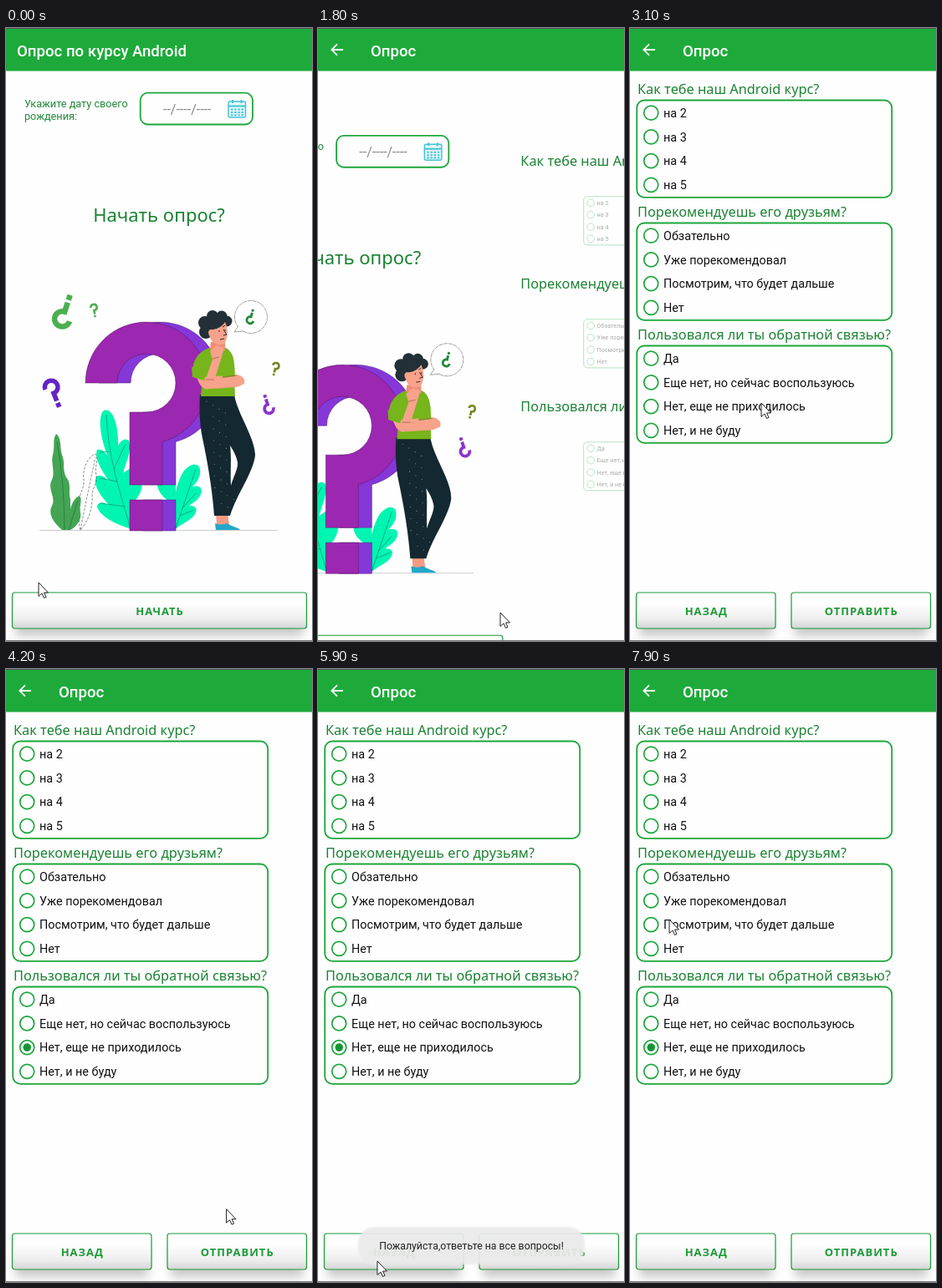
Recreate the animation shown at these times as an HTML page. Size 366 px wide and 734 px high, loop 8 s.

```html
<!DOCTYPE html>
<html lang="ru">
<head>
<meta charset="utf-8">
<style>
html, body { margin: 0; width: 100%; height: 100%; overflow: hidden; background: #fefefe }
svg { display: block }
text { font-family: Roboto, sans-serif }
.noto { font-family: "Noto Sans", "Open Sans", sans-serif; fill: #1a8232 }
.bar { font-size: 18.6px; font-weight: 500; fill: #fff }
.button text { font: 700 13px "Noto Sans", "Open Sans", sans-serif; letter-spacing: 1px; fill: #1d9a38 }
.line { fill: none; stroke: #1ea63b }
</style>
</head>
<body>
<svg width="366" height="734" viewBox="0 0 366 734">
  <defs>
    <linearGradient id="shade" x2="0" y2="1">
      <stop offset=".3" stop-color="#fefefe"/><stop offset=".75" stop-color="#ededed"/><stop offset="1" stop-color="#d4d4d4"/>
    </linearGradient>
    <filter id="blur" x="-10%" y="-60%" width="120%" height="220%"><feGaussianBlur stdDeviation="6"/></filter>
    <filter id="soft" x="-10%" y="-30%" width="120%" height="160%"><feGaussianBlur stdDeviation="1"/></filter>
    <path id="mark" d="M-73-52A73 73 0 1 1 19 18.5V70H-20V-17H0A35 35 0 1 0-35-52ZM-20 88H19V125H-20Z"/>
  </defs>

  <g id="home">
    <g font-size="12.7" fill="#23883a">
      <text x="22" y="95">Укажите дату своего</text>
      <text x="22" y="109.5">рождения:</text>
    </g>
    <rect x="160.7" y="77.7" width="134.3" height="37.8" rx="9" class="line" stroke-width="1.8"/>
    <text x="188" y="102.5" font-size="16" fill="#888">--/----/----</text>
    <g fill="none" stroke="#45c3d5" stroke-width="1.5">
      <rect x="266" y="88" width="20.5" height="19" rx="2" fill="#e4f8fa"/>
      <path d="M266 93.5H286.5M271 86V90M281.5 86V90" stroke-width="2"/>
      <path d="M269 97.5H284M269 101H284M269 104.3H284" stroke-dasharray="2.4 1.8" stroke-width="2"/>
    </g>
    <text class="noto" x="183" y="231.5" font-size="22" text-anchor="middle">Начать опрос?</text>

    <path d="M40 601.5H325" stroke="#ccc"/>
    <g fill="#00f5b2">
      <path d="M149 600C132 594 111 585 109 572Q112 565 123 571C111 558 104 546 108 537Q116 533 125 545C114 530 105 514 109 505Q116 503 122 513C113 493 109 465 117 458C128 454 135 477 134 500Q140 489 147 494C151 506 143 521 140 533L150 526V546H163Q162 558 154 566H149Z"/>
      <path d="M203 600C199 573 201 549 213 530Q224 518 231 525C235 534 229 544 223 549Q234 547 234 555C232 565 224 568 219 572Q230 572 227 580C223 590 211 592 203 600ZM181 547H203V566H194Q182 558 181 547Z"/>
    </g>
    <g fill="none" stroke="#147d68" stroke-width=".6">
      <path d="M149 600C137 556 123 520 120 463M142 573 113 569M133 543 112 539M129 528 143 498M123 507 112 508M203 599 227 528M211 575 227 557M208 584 225 577"/>
      <path d="M89 601C85 590 90 582 87 573C85 561 94 553 93 541C91 528 98 513 107 510C112 517 105 526 108 535C110 546 102 551 103 561C104 574 98 592 89 601ZM89 601Q98 555 107 514" stroke="#444" stroke-dasharray="3 1.6"/>
    </g>
    <path d="M67 601C56 592 50 581 55 572C60 562 50 553 54 543C60 532 53 522 56 511C59 500 55 493 60 486C67 491 64 502 67 511C71 520 67 528 72 538C79 546 74 555 77 564L77 576C79 568 83 562 88 560C92 566 87 573 89 580C91 589 84 597 77 601Z" fill="#43a554"/>
    <path d="M70 601Q70 545 61 495M75 601 86 566" fill="none" stroke="#28763c" stroke-width=".8"/>

    <use href="#mark" x="184" y="477" fill="#8537d8" stroke="#452077" stroke-width=".5"/>
    <use href="#mark" x="168" y="477" fill="#9c27b0" stroke="#501760" stroke-width=".5"/>
    <g id="marks"></g>

    <circle cx="293" cy="346" r="19.5" fill="#fefefe" stroke="#777" stroke-width=".7" stroke-dasharray="5 .8"/>
    <path d="M278 357 273 364 284 363" fill="#fefefe" stroke="#777" stroke-width=".7"/>
    <use href="#mark" transform="translate(293 346) rotate(195) scale(.075)" fill="#23883a"/>

    <path d="M251 580H265L267 595H252Z" fill="#f59b82"/>
    <path d="M250 593Q257 596 264 593C270 597 278 598 280 601H251Z" fill="#22a7c8"/>
    <path d="M232 439H273C277 463 298 490 298 512C295 534 277 556 268 584H249C247 554 241 520 236 496C231 475 231 456 232 439ZM268 500C270 516 268 532 269 548C272 537 278 527 277 520Q275 510 268 500Z" fill="#142831" fill-rule="evenodd"/>
    <g id="dots" fill="#8a989c"></g>
    <path d="M243 383C229 388 222 399 223 417L235 420 233 441H274L273 416C274 398 272 388 263 383Z" fill="#76b51b"/>
    <path d="M245 376H262V386Q253 392 244 384Z" fill="#ef8e78"/>
    <g fill="#233037">
      <circle cx="238" cy="353" r="8"/><circle cx="247" cy="345" r="7"/><circle cx="258" cy="345" r="6.5"/>
      <circle cx="264" cy="351" r="6.5"/><circle cx="239" cy="364" r="8"/><circle cx="249" cy="356" r="12"/>
    </g>
    <path d="M248 361Q258 359 262 352C266 360 266 371 261 378C253 382 245 376 244 370Q240 364 244 361Z" fill="#f7a28a"/>
    <path d="M251 360 256 357M259 358 262 356M260 361 264 367 260 368M256 373 261 372M255 362V364M262 361V363" fill="none" stroke="#263238"/>
    <path d="M227 416 239 420 247 397 244 387 252 380 261 383 257 397 247 429Q240 437 232 427Z" fill="#f7a28a"/>
    <path d="M238 418 277 415Q287 418 285 426L276 430 244 432Q235 427 238 418Z" fill="#f7a28a"/>
    <path d="M222 406 240 408 237 422 223 418ZM260 401 273 402 274 417 259 419Z" fill="#76b51b"/>
    <path d="M239 421 249 421M259 418 276 416M247 396 255 394" fill="none" stroke="#9d594b" stroke-width=".7"/>
  </g>

  <g id="survey"></g>

  <rect width="366" height="51.5" fill="#1daa3a"/>
  <path d="M0 .5H366" stroke="#53515c"/>
  <text id="homeBar" class="bar" x="13" y="33.5">Опрос по курсу Android</text>
  <g id="surveyBar">
    <text class="bar" x="63" y="33.5">Опрос</text>
    <path d="M30 26H16.5M23 19.3 16.3 26 23 32.7" fill="none" stroke="#fff" stroke-width="1.8"/>
  </g>

  <g id="toast">
    <rect x="48" y="668" width="271" height="45" rx="20" fill="#eaeaea" fill-opacity=".93" filter="url(#soft)"/>
    <text x="183.5" y="694.5" font-size="12.3" fill="#222" text-anchor="middle">Пожалуйста,ответьте на все вопросы!</text>
  </g>
  <path d="M0 733.5H366" stroke="#777"/>
  <path id="cursor" d="M0 0V16.5L4 13 6.5 18.5 9 17.4 6.6 12H11.5Z" fill="#fff" stroke="#222"/>
</svg>
<script>
const $ = id => document.getElementById(id);
const LOOP = 8000;

const button = (x, w, label, id) => `<g class="button">
  <rect x="${x + 4}" y="694" width="${w - 8}" height="34" fill="#aaa" opacity=".65" filter="url(#blur)"/>
  <rect x="${x}" y="676" width="${w}" height="43" rx="3" fill="url(#shade)"/>
  <rect id="${id}" x="${x}" y="676" width="${w}" height="43" rx="3" fill="#a6e0b2" fill-opacity="0" stroke="#1d9a38" stroke-width="1.2"/>
  <text x="${x + w / 2 + .5}" y="702.5" text-anchor="middle">${label}</text></g>`;

const questions = [
  ['Как тебе наш Android курс?', 'на 2', 'на 3', 'на 4', 'на 5'],
  ['Порекомендуешь его друзьям?', 'Обзательно', 'Уже порекомендовал', 'Посмотрим, что будет дальше', 'Нет'],
  ['Пользовался ли ты обратной связью?', 'Да', 'Еще нет, но сейчас воспользуюсь', 'Нет, еще не приходилось', 'Нет, и не буду']
];

const option = (label, i) => {
  const y = 101.7 + i * 28.7;
  return `<circle cx="25.2" cy="${y}" r="8.5" class="line" stroke-width="1.7"/>
    <text x="40" y="${y + 5.2}" font-size="14.4" fill="#111">${label}</text>`;
};

$('survey').innerHTML = questions.map(([title, ...options], i) =>
  `<g transform="translate(0 ${i * 147})"><text class="noto" x="9" y="79" font-size="16.3">${title}</text>
  <g class="options"><rect x="8.2" y="86.5" width="305" height="116.3" rx="9" class="line" stroke-width="1.8"/>
  ${options.map(option).join('')}</g></g>`).join('') +
  '<circle id="choice" cx="25.2" cy="453.1" r="4.8" fill="#129631"/>' +
  button(7.5, 166.5, 'НАЗАД', 'back') + button(193, 166.5, 'ОТПРАВИТЬ', 'send');

$('home').insertAdjacentHTML('beforeend', button(7.5, 352, 'НАЧАТЬ', 'start'));

$('marks').innerHTML = [
  [70, 340, 198, .17, '#4caf50'], [105.5, 338, -8, .067, '#4caf50'], [57, 437, -22, .145, '#6424c4'],
  [313, 451, 162, .1, '#8a35cc'], [322, 408, 14, .067, '#76831f']
].map(([x, y, angle, scale, color]) =>
  `<use href="#mark" transform="translate(${x} ${y}) rotate(${angle}) scale(${scale})" fill="${color}"/>`).join('');

$('dots').innerHTML = Array.from({ length: 28 }, (_, i) => {
  const y = 447 + i * 4.7, x = 240 + i * .45 + (i * 7) % 22;
  return `<circle cx="${x}" cy="${y}" r=".55"/>`;
}).join('');

const clamp = v => Math.min(1, Math.max(0, v));
const ramp = (t, from, to) => clamp((t - from) / (to - from));
const ease = u => .5 - .5 * Math.cos(Math.PI * u);
const pulse = (t, a, b, c, d) => ramp(t, a, b) * (1 - ramp(t, c, d));

// time, x, y
const path = [
  [100, 39, 664], [600, 218, 700], [1900, 218, 700], [2400, 183, 487], [3000, 157, 449],
  [3700, 157, 449], [4400, 288, 692], [4750, 288, 692], [5000, 358, 590], [5300, 350, 600],
  [5900, 71, 709], [6500, 60, 650], [7500, 47, 310], [7900, 47, 300]
];

function cursorAt(t) {
  const next = path.findIndex(p => p[0] >= t);
  if (next < 0) return path.at(-1).slice(1);
  if (!next) return path[0].slice(1);
  const [a, b] = [path[next - 1], path[next]];
  const u = ease(ramp(t, a[0], b[0]));
  return [1, 2].map(k => a[k] + (b[k] - a[k]) * u);
}

const move = (id, x, y) => $(id).setAttribute('transform', `translate(${x} ${y})`);
const show = (id, on) => $(id).setAttribute('opacity', +on);
const optionGroups = document.querySelectorAll('.options');
const shiftX = 372, shiftY = 137.5;

function draw(now) {
  const t = now % LOOP;
  const slide = ease(ramp(t, 1500, 2220));
  move('home', -shiftX * slide, shiftY * slide);
  move('survey', shiftX * (1 - slide), shiftY * (1 - slide));
  show('home', slide < 1);
  show('survey', slide > 0);
  show('homeBar', t < 1500);
  show('surveyBar', t >= 1500);

  const grow = ease(ramp(t, 1980, 2930)), scale = .5 + .5 * grow;
  optionGroups.forEach(g => {
    g.setAttribute('transform', `translate(160.5 144.5) scale(${scale}) translate(-160.5 -144.5)`);
    g.setAttribute('opacity', .35 + .65 * grow);
  });

  show('choice', t >= 3400);
  $('start').setAttribute('fill-opacity', .5 * pulse(t, 1200, 1300, 1400, 1700));
  $('send').setAttribute('fill-opacity', .45 * pulse(t, 4650, 4800, 5050, 5350));
  show('toast', pulse(t, 5200, 5450, 7250, 7500));
  move('cursor', ...cursorAt(t));
  requestAnimationFrame(draw);
}
requestAnimationFrame(draw);
</script>
</body>
</html>
```
